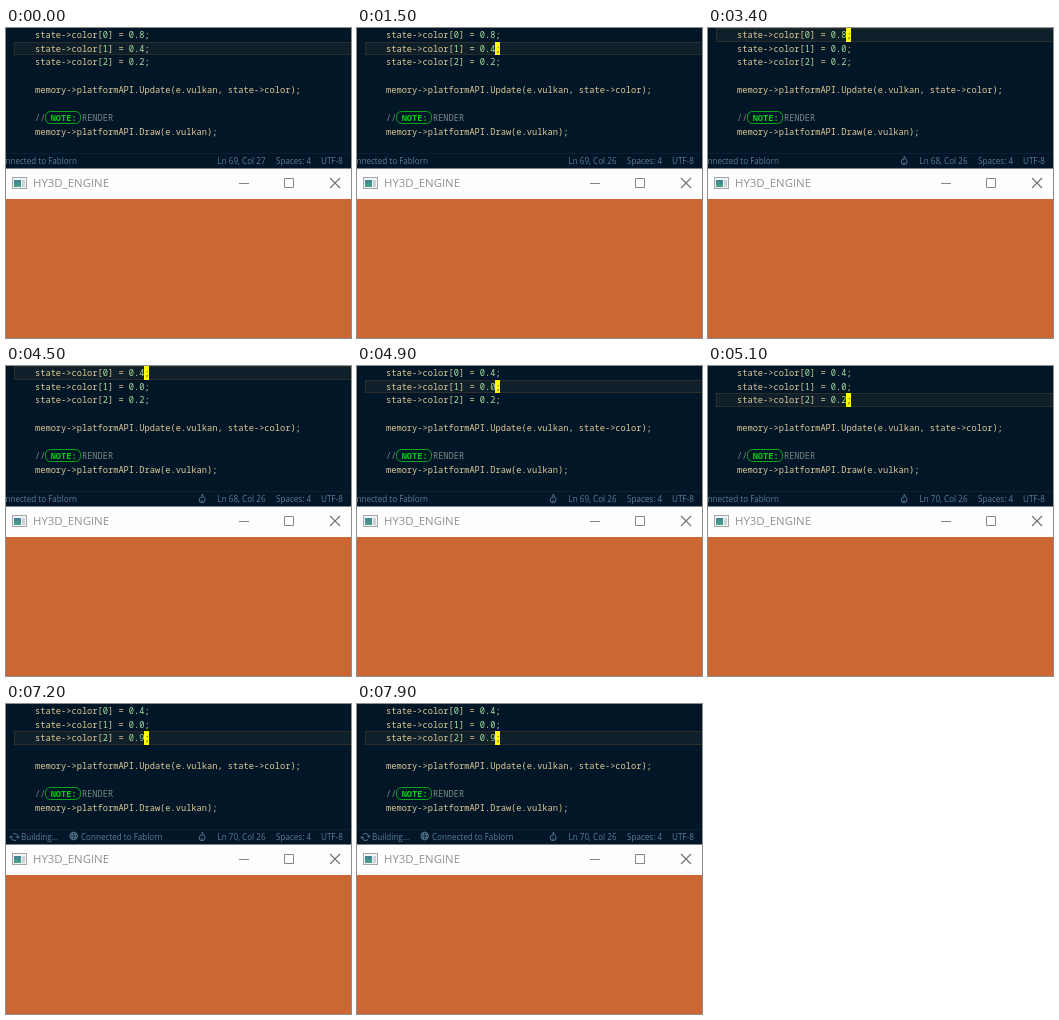
An HTML page that plays this animation: 345 px wide and 310 px high, repeating every 8 s.

```html
<!DOCTYPE html>
<html lang="en">
<head>
<meta charset="utf-8">
<title>Live colour editing</title>
<style>
  html, body { margin: 0; width: 100%; height: 100%; overflow: hidden; background: #011627; }
  svg { display: block; width: 345px; height: 310px; }
  text { white-space: pre; }
  .code { font: 8.7px "Noto Sans Mono", "DejaVu Sans Mono", monospace; fill: #e2cb98; }
  .num { fill: #a8e0a0; }
  .note { fill: #08c818; font-weight: 700; }
  .dim { fill: #7c8585; }
  .status { font: 8.1px "Open Sans", "Noto Sans", sans-serif; fill: #5f7e97; }
  .title { font: 11.4px "Open Sans", "Noto Sans", sans-serif; fill: #909090; }
  .icon { fill: none; stroke: #5f7e97; stroke-width: .9; }
  .button { fill: none; stroke: #858585; stroke-width: 1; }
  .close { stroke: #707070; stroke-width: 1.1; }
</style>
</head>
<body>
<svg viewBox="0 0 345 310">
  <defs>
    <linearGradient id="pane" x2="0" y2="1">
      <stop stop-color="#3f7f96"/>
      <stop offset="1" stop-color="#4aa583"/>
    </linearGradient>
  </defs>
  <rect width="345" height="140" fill="#011627"/>
  <rect id="active" x="8.5" width="340" fill="#10202a" stroke="#2d2d2b"/>
  <g id="code" class="code"></g>
  <g id="cursor">
    <rect id="block" width="5" fill="#ff0"/>
    <text id="under" class="code" style="fill:#5a4a08"></text>
  </g>
  <rect x="39.5" y="83.5" width="35" height="12" rx="5" fill="none" stroke="#08a818"/>

  <path d="M0 125.5H345" stroke="#0c2031"/>
  <g class="status">
    <g id="build">
      <g id="spinner" class="icon">
        <path d="M-3.4 -.8A3.5 3.5 0 0 1 2.8 -2.1M3.4 .8A3.5 3.5 0 0 1 -2.8 2.1M3.2 -4V-1.7H.9M-3.2 4V1.7H-.9"/>
      </g>
      <text id="label" x="15" y="136">Building...</text>
    </g>
    <g id="link">
      <g class="icon">
        <circle cx="67.7" cy="132" r="3.8"/>
        <ellipse cx="67.7" cy="132" rx="1.7" ry="3.8"/>
        <path d="M64.2 130.7H71.2M64.2 133.3H71.2"/>
      </g>
      <text x="75" y="136">Connected to Fablorn</text>
    </g>
    <path id="flame" class="icon" d="M196.3 128.2C196.8 130.4 199 131.4 199 133.8A2.9 2.9 0 0 1 193.2 133.8C193.2 132.6 193.8 131.7 194.5 131.2C194.8 132 195.2 132.2 195.6 132C196.4 131 195.5 129.4 196.3 128.2ZM196 136.2V134"/>
    <text id="place" x="211.5" y="136"></text>
    <text x="270" y="136">Spaces: 4</text>
    <text x="315" y="136">UTF-8</text>
  </g>

  <rect y="140" width="345" height="1" fill="#7d868c"/>
  <rect y="141" width="345" height="30" fill="#fefefe"/>
  <rect x="6.5" y="149.5" width="14" height="11" fill="#f2f4f5" stroke="#a0a8ae"/>
  <rect x="8" y="152" width="7" height="7" fill="url(#pane)"/>
  <rect x="16" y="152" width="3" height="7" fill="#ccd4d8"/>
  <text class="title" x="27" y="159.4">HY3D_ENGINE</text>
  <path class="button" d="M233 155.5H243M278.5 150.5H287.5V159.5H278.5Z"/>
  <path class="button close" d="M324 150L334 160M334 150L324 160"/>
  <rect y="171" width="345" height="139" fill="#c63"/>
</svg>
<script>
const LOOP = 8000, LEFT = 29, ADVANCE = 5.22, PITCH = 13.85;
const $ = id => document.getElementById(id);
const baseline = row => 9.7 + row * PITCH;
const rowTop = row => Math.floor(row * 13.75 + .25);

// Each step changes only the listed parts of the editor state.
const steps = [
  [0, { row: 1, col: 27, on: false, digits: ['8', '4', '2'], flame: false, shift: -85.5, build: 0 }],
  [600, { on: true }],
  [1000, { on: false }],
  [1500, { on: true, col: 26 }],
  [1700, { col: 25 }],
  [2100, { on: false }],
  [2400, { on: true, digits: ['8', '', '2'] }],
  [2700, { col: 26, digits: ['8', '0', '2'] }],
  [3200, { on: false }],
  [3300, { on: true, row: 0 }],
  [3400, { flame: true }],
  [3700, { col: 25 }],
  [4100, { on: false }],
  [4500, { on: true, col: 26, digits: ['4', '0', '2'] }],
  [4900, { row: 1 }],
  [5100, { row: 2 }],
  [5500, { col: 25 }],
  [5600, { digits: ['4', '0', ''] }],
  [6000, { col: 26, digits: ['4', '0', '9'] }],
  [6500, { on: false }],
  [6900, { on: true, shift: -42, build: 1 }],
  [7100, { shift: 0, build: 2 }],
  [7400, { on: false }],
  [7900, { on: true }]
];
let last = {};
const states = steps.map(([time, change]) => last = { ...last, ...change, time });

const num = s => `<tspan class="num">${s}</tspan>`;
const line = (row, body) => `<text x="${LEFT}" y="${baseline(row)}">${body}</text>`;
const assign = (digit, i) =>
  line(i, `state-&gt;color[${num(i)}] = ${num('0.' + digit)};`);
const calls =
  line(4, 'memory-&gt;platformAPI.Update(e.vulkan, state-&gt;color);') +
  line(6, '<tspan class="dim">// </tspan><tspan class="note">NOTE:</tspan><tspan class="dim"> RENDER</tspan>') +
  line(7, 'memory-&gt;platformAPI.Draw(e.vulkan);');

const show = (id, visible) => $(id).setAttribute('visibility', visible ? 'visible' : 'hidden');
const set = (id, attrs) => {
  for (const name in attrs) $(id).setAttribute(name, attrs[name]);
};

function render(s) {
  $('code').innerHTML = s.digits.map(assign).join('') + calls;
  const top = rowTop(s.row), height = rowTop(s.row + 1) - top;
  set('active', { y: top + .5, height: height - 1 });

  const index = s.col - 5, x = LEFT + index * ADVANCE;
  const source = `state->color[${s.row}] = 0.${s.digits[s.row]};`;
  $('under').textContent = source[index] || '';
  set('under', { x, y: baseline(s.row) });
  set('block', { x: Math.floor(x + .2), y: top, height });
  show('cursor', s.on);

  $('place').textContent = `Ln ${68 + s.row}, Col ${s.col}`;
  show('flame', s.flame);
  show('build', s.build > 0);
  show('label', s.build > 1);
  set('link', { transform: `translate(${s.shift} 0)` });
}

let current;
function tick(now) {
  const t = now % LOOP;
  const state = states.findLast(s => s.time <= t);
  if (state !== current) render(current = state);
  const turn = Math.max(0, Math.floor((t - 7000) / 100)) * 24;
  set('spinner', { transform: `translate(8.5 133) rotate(${turn})` });
  requestAnimationFrame(tick);
}
tick(0);
</script>
</body>
</html>
```
